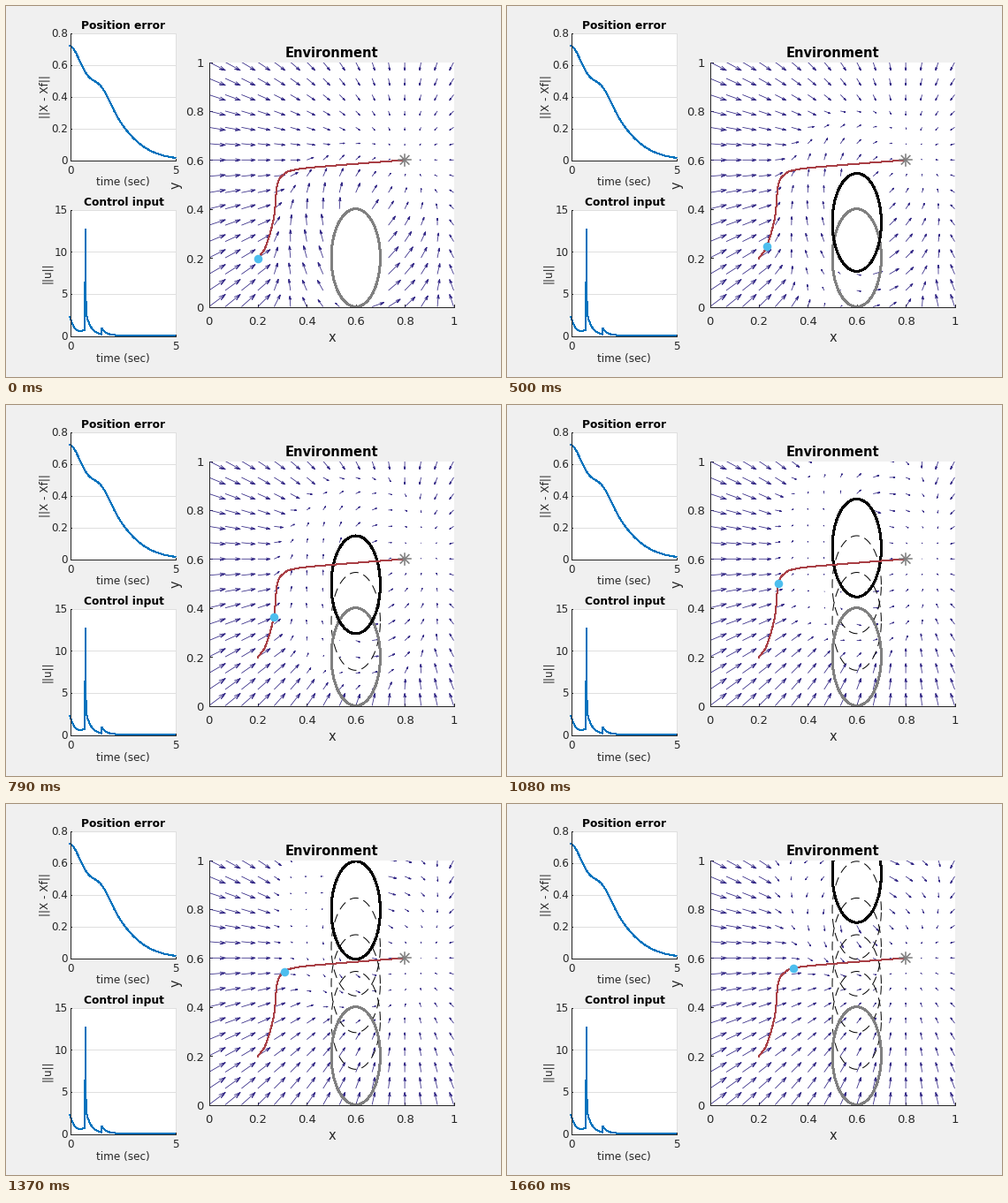
A matplotlib script that plays this animation: 560x420 px, repeating every 1950 ms.

```python
import numpy as np
import matplotlib.pyplot as plt
from matplotlib.animation import FuncAnimation
from matplotlib.collections import LineCollection
from matplotlib.patches import Rectangle

W, H, DPI = 560, 420, 100
TICK_MS, LOOP_MS = 10, 1950
FIRST_MS, HOLD_MS, STEPS = 500, 290, 6
PT = 72 / DPI
DARK, GRID, BLUE, GRAY = "#262626", "#dfdfdf", "#0072bd", "#808080"
X0, Y0, SIDE = 229.5, 340.5, 277
GOAL = np.array([0.8, 0.6])
RX, RY, REACH = 0.1, 0.2, 0.3

plt.rcParams["font.family"] = "DejaVu Sans"
fig = plt.figure(figsize=(W / DPI, H / DPI), dpi=DPI, facecolor="#f0f0f0")
ax = fig.add_axes([0, 0, 1, 1])
ax.set(xlim=(0, W), ylim=(H, 0))
ax.axis("off")


def line(x, y, color, width=1, **kw):
    return ax.plot(x, y, color=color, lw=width * PT, **kw)[0]


def text(x, y, s, px, ha="center", va="baseline", color=DARK, **kw):
    ax.text(x, y, s, fontsize=px * PT, ha=ha, va=va, color=color, **kw)


def panel(left, top, right, bottom):
    """White box with a left and a bottom axis."""
    line([left, left], [top, bottom], DARK, zorder=9)
    line([left, right], [bottom, bottom], DARK, zorder=9)
    box = Rectangle((left, top), right - left, bottom - top, fc="white", lw=0, zorder=0)
    return ax.add_patch(box)


def small_plot(top, bottom, y_max, y_step, title, ylabel, ylabel_x, t, values):
    left, right = 72.5, 191.5
    panel(left, top, right, bottom)
    line([right, right], [top, bottom], GRID, zorder=1)
    for v in np.arange(0, y_max + y_step / 2, y_step):
        y = bottom - (bottom - top) * v / y_max
        if v:
            line([left, right], [y, y], GRID, zorder=1)
            line([left, left + 1.5], [y, y], DARK)
        text(70, y + 4.5, f"{v:.2g}", 12, "right")
    for x, s in ((left, "0"), (right, "5")):
        line([x, x], [bottom - 1.5, bottom], DARK)
        text(x, bottom + 15.5, s, 12)
    mid = (left + right) / 2
    text(mid, bottom + 29, "time (sec)", 12)
    text(mid + 1, top - 4.5, title, 12.2, color="black", weight="bold")
    text(ylabel_x, (top + bottom) / 2, ylabel, 12, va="center", rotation=90)
    line(left + (right - left) * t / 5, bottom - (bottom - top) * values / y_max,
         BLUE, 1, zorder=5, antialiased=False)


t = np.linspace(0, 5, 501)
error = (0.6 / (1 + np.exp(1.25 * (t - 2.05)))
         + 0.163 * np.exp(-(t / 0.62) ** 2)
         + 0.06 * np.exp(-((t - 1.5) / 0.55) ** 2))


def kick(start, size, rate):
    return np.where(t >= start, size * np.exp(-rate * (t - start)), 0)


control = (kick(0, 2.2, 4.5) + kick(0.75, 2.6, 4) + kick(1.5, 0.75, 5) + 0.06
           + np.where(t < 0.72, 0.6 * (t / 0.72) ** 2, 0)
           + 12.5 * np.maximum(0, 1 - np.abs(t - 0.73) / 0.03))

small_plot(30.5, 174.5, 0.8, 0.2, "Position error", "||X - Xf||", 44, t, error)
small_plot(230.5, 373.5, 15, 5, "Control input", "||u||", 46, t, control)

arena = panel(X0, Y0 - SIDE, X0 + SIDE, Y0)
for v in np.linspace(0, 1, 6):
    d = SIDE * v
    line([X0 + d, X0 + d], [Y0 - 3, Y0], DARK)
    line([X0, X0 + 3], [Y0 - d, Y0 - d], DARK)
    text(X0 + d, 361, f"{v:.1g}", 13.3)
    text(224, Y0 - d + 5.5, f"{v:.1g}", 13.3, "right")
text(368.5, 379.5, "x", 14.67)
text(192, 203, "y", 14.67, va="center", rotation=90)
text(368, 58, "Environment", 14.67, color="black", weight="bold")

ring = np.linspace(0, 2 * np.pi, 121)
RIM = np.stack([RX * np.cos(ring), RY * np.sin(ring)], -1)
axis = np.linspace(0, 1, 16)
NODES = np.stack(np.meshgrid(axis, axis), -1).reshape(-1, 2)


def to_px(p):
    return np.stack([X0 + SIDE * p[..., 0], Y0 - SIDE * p[..., 1]], -1)


def ellipse(cy, color, width, **kw):
    artist = line(*to_px(RIM + [0.6, cy]).T, color, width, **kw)
    artist.set_clip_path(arena)
    return artist


def height(step):
    return 0.2 if step == 0 else 0.195 + 0.15 * step


def arrows(step):
    """Pull to the goal plus a push off the ellipse that fades near the goal."""
    rel = NODES - [0.6, height(step)]
    outside = (rel[:, 0] / RX) ** 2 + (rel[:, 1] / RY) ** 2 > 1
    nodes, rel = NODES[outside], rel[outside]
    gap = rel[:, None] - RIM[None]
    dist = np.hypot(gap[..., 0], gap[..., 1])
    near = dist.argmin(1)
    rows = np.arange(len(rel))
    d = np.maximum(dist[rows, near], 1e-6)
    n = gap[rows, near] / d[:, None]
    pull = GOAL - nodes
    push = np.hypot(*pull.T) * np.clip(1 - (d / REACH) ** 3, 0, 1)
    v = 23.4 * pull + 24 * push[:, None] * n
    v[:, 1] += 8 * push * np.minimum(1, 1 + n[:, 1])
    v[:, 1] *= -1
    tail = to_px(nodes)
    tip = tail + v
    side = 0.28 * np.stack([v[:, 1], -v[:, 0]], -1)
    return np.stack([tail, tip, tip - 0.33 * (v + side), tip,
                     tip - 0.33 * (v - side)], 1)


fields = [arrows(k) for k in range(STEPS)]
field = LineCollection(fields[0], colors="#352a87", linewidths=0.8 * PT,
                       joinstyle="bevel", zorder=2)
ax.add_collection(field, autolim=False)
field.set_clip_path(arena)

ellipse(0.2, GRAY, 2, zorder=4, antialiased=False)
trail = [ellipse(height(k), "black", 1, zorder=3, linestyle=(0, (10, 6)))
         for k in range(1, STEPS - 1)]
obstacle = ellipse(0.2, "black", 2, zorder=5, antialiased=False)


def smooth(points, n=12):
    """Catmull-Rom curve through the points."""
    p = np.array(points, float)
    p = np.vstack([2 * p[0] - p[1], p, 2 * p[-1] - p[-2]])
    s = np.linspace(0, 1, n)[:, None]
    return np.vstack([
        0.5 * (2 * b + (c - a) * s + (2 * a - 5 * b + 4 * c - d) * s**2
               + (3 * b - a - 3 * c + d) * s**3)
        for a, b, c, d in zip(p, p[1:], p[2:], p[3:])]).T


stops = [(285, 285.5), (294, 271.8), (303, 239.8), (307, 202), (315, 190), (324, 186)]
star = to_px(GOAL)
route = smooth(stops + [(340, 183.5), (370, 180.8), tuple(star)])
line(*route, "#a94046", 1, zorder=6, antialiased=False)

for a in np.arange(4) * np.pi / 4:
    dx, dy = 6.7 * np.cos(a), 6.7 * np.sin(a)
    line([star[0] - dx, star[0] + dx], [star[1] - dy, star[1] + dy],
         GRAY, 1.6, zorder=7)
dot = line([0], [0], "#4dbeee", marker="o", ms=9.6 * PT, mew=0, zorder=8)


def update(i):
    step = max(0, (i * TICK_MS - FIRST_MS) // HOLD_MS + 1)
    field.set_segments(fields[step])
    obstacle.set_visible(step > 0)
    obstacle.set_data(*to_px(RIM + [0.6, height(step)]).T)
    for k, past in enumerate(trail, 1):
        past.set_visible(k < step)
    x, y = stops[step]
    dot.set_data([x], [y])
    return field, obstacle, dot, *trail


anim = FuncAnimation(fig, update, frames=LOOP_MS // TICK_MS, interval=TICK_MS,
                     init_func=lambda: update(0), repeat=True, repeat_delay=0)
plt.show()
```
